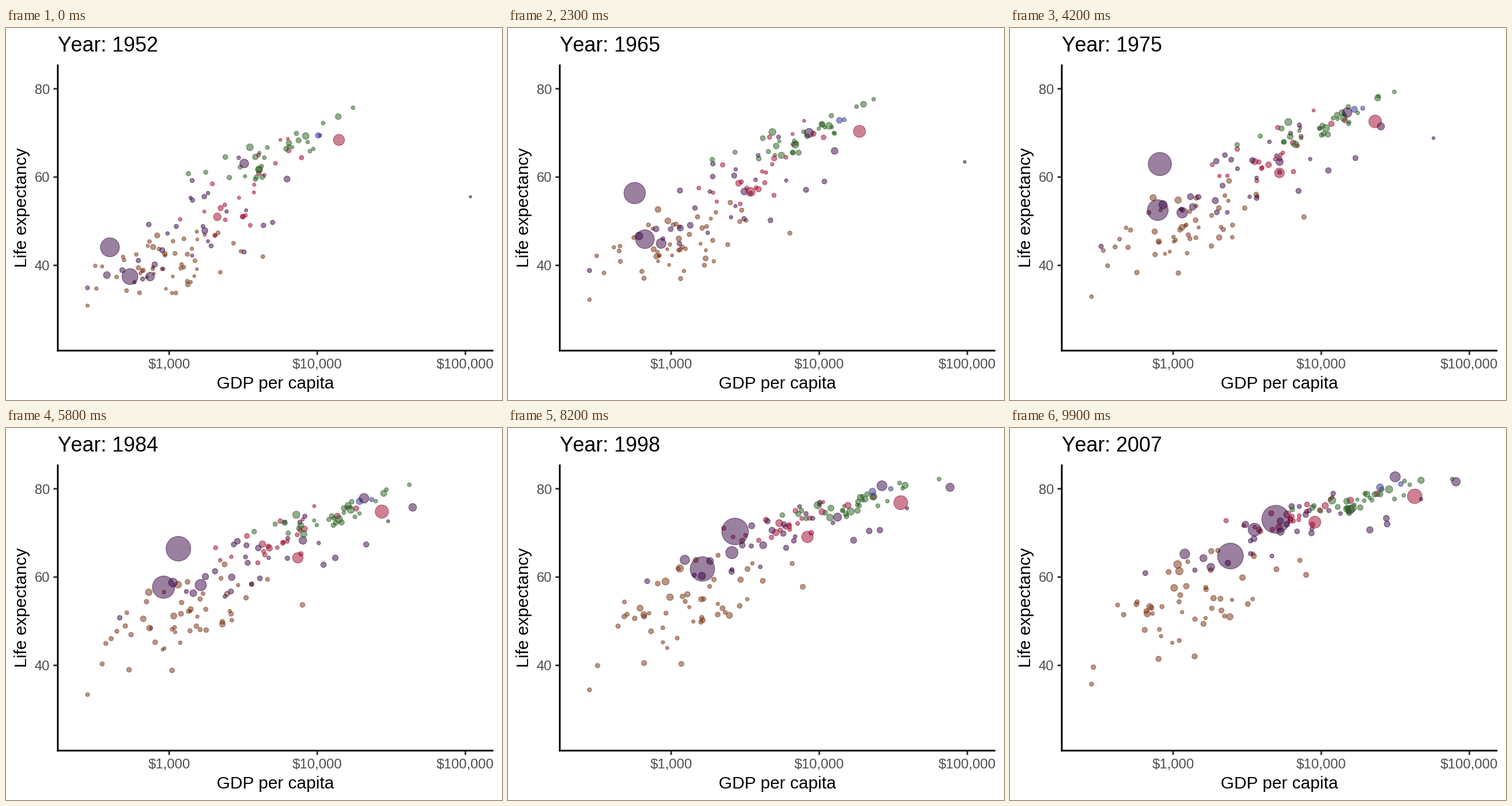
These frames come from a looping animation (864 by 648 pixels, 10000 ms). A matplotlib script:

```python
import numpy as np
import matplotlib.pyplot as plt
from matplotlib.animation import FuncAnimation

W, H, FRAMES = 864, 648, 100
plt.rcParams["font.family"] = "Liberation Sans"
plt.rcParams["path.snap"] = False

t = np.linspace(0, 1, FRAMES)
ease = 1 - (1 - t) ** 1.4
rng = np.random.default_rng(11)

COLORS = dict(africa="#752F0E", americas="#9C0628", asia="#370442",
              europe="#225C1A", oceania="#2D3190")

# Each region is a cloud along a sloping trend; pairs run from start to end.
CLOUDS = dict(
    africa=dict(n=52, pop=(4, 13), x=(278, 318), y=(418, 308),
                sx=(66, 86), sy=(33, 46), slope=(-0.15, -0.35)),
    americas=dict(n=23, pop=(4, 11), x=(415, 500), y=(300, 156),
                  sx=(54, 62), sy=(36, 13), slope=(-0.75, -0.25)),
    asia=dict(n=29, pop=(9, 25), x=(318, 492), y=(355, 174),
              sx=(86, 122), sy=(45, 24), slope=(-0.55, -0.32)),
    europe=dict(n=30, pop=(9, 12), x=(463, 616), y=(220, 124),
                sx=(62, 62), sy=(17, 9), slope=(-0.42, -0.28)),
    oceania=dict(n=2, pop=(4, 10), x=(545, 664), y=(188, 101),
                 sx=(4, 24), sy=(1, 1), slope=(-0.3, -0.2)),
)

# The leading bubbles: population in millions, then a few path points.
STOPS = (0, 0.31, 0.58, 1)
LEADERS = [
    ("asia", (556, 1319), (181, 234, 298, 463), (382, 256, 211, 159)),
    ("asia", (372, 1110), (216, 246, 273, 384), (433, 346, 278, 223)),
    ("americas", (158, 301), (580, 623, 654, 705), (195, 175, 146, 119)),
    ("asia", (82, 224), (251, 272, 338, 426), (433, 356, 275, 177)),
    ("asia", (86, 127), (415, 561, 623, 671), (236, 165, 123, 85)),
    ("americas", (57, 190), (368, 441, 508, 531), (329, 271, 227, 164)),
    ("asia", (0.2, 2.5), (809, 791, 665, 716), (294, 213, 163, 124)),
]

xs, ys, pops, colors = [], [], [], []


def add(region, x, y, pop):
    xs.append(x)
    ys.append(y)
    pops.append(pop)
    colors.append(COLORS[region])


def drift(pair):
    return pair[0] + (pair[1] - pair[0]) * ease


def noise():
    return np.clip(rng.normal(), -1.7, 1.7)


def wander(size):
    """Slow sideways sway, different for every dot."""
    phase, turns = rng.uniform(0, 2 * np.pi), rng.uniform(0.4, 1)
    return size * np.sin(phase + 2 * np.pi * turns * t)


def cloud(region, n, pop, x, y, sx, sy, slope):
    for i in range(n):
        u = (i + 0.5) / n
        spread = 0.55 * np.log(u / (1 - u))
        dx = drift(sx) * (spread + wander(0.25))
        dy = drift(slope) * dx + drift(sy) * (noise() + wander(0.3))
        people = np.exp(0.9 * noise()) * (pop[0] + (pop[1] - pop[0]) * t)
        add(region, np.maximum(drift(x) + dx, 142),
            np.clip(drift(y) + dy, 89, 499), people)


for region, spec in CLOUDS.items():
    cloud(region, **spec)
for region, pop, px, py in LEADERS:
    add(region, np.interp(t, STOPS, px), np.interp(t, STOPS, py),
        np.interp(t, (0, 1), pop))

EDGE = 1.3
xy = np.stack([xs, ys], axis=-1)
radius = 2.6 + 22.4 * np.sqrt(np.array(pops) / 1319) - EDGE / 2

fig = plt.figure(figsize=(W / 72, H / 72), dpi=72, facecolor="white")
ax = fig.add_axes([0, 0, 1, 1])
ax.set(xlim=(0, W), ylim=(H, 0))
ax.axis("off")


def line(x, y, color="black"):
    ax.plot(x, y, color=color, lw=2.9, solid_capstyle="butt", zorder=1)


def label(x, y, text, size, color="black", ha="center", **kw):
    return ax.text(x, y, text, fontsize=size, color=color, ha=ha,
                   va="baseline", **kw)


LEFT, BASE, TICK = 90.2, 562, 7.5
for life in (40, 60, 80):
    y = 413.5 - (life - 40) * 7.69
    line((LEFT - TICK, LEFT), (y, y), "#333333")
    label(76.7, y + 8.8, str(life), 24, "#4D4D4D", "right")
for power in (3, 4, 5):
    x = 284.2 + (power - 3) * 258
    line((x, x), (BASE, BASE + TICK), "#333333")
    label(x, 593.5, f"${10 ** power:,}", 24, "#4D4D4D")
line((LEFT, LEFT), (63.5, BASE + 1.4))
line((LEFT - 1.4, 849), (BASE, BASE))
label(469.3, 627.5, "GDP per capita", 30)
label(36, 313, "Life expectancy", 30, rotation=90, rotation_mode="anchor")

# The capital stands apart so that it is not kerned into the next letter.
label(89.2, 41, "Y", 36, ha="left")
title = label(113.2, 41, "", 36, ha="left")

dots = ax.scatter(xy[:, 0, 0], xy[:, 0, 1], s=(2 * radius[:, 0]) ** 2,
                  c=colors, alpha=0.5, linewidths=EDGE, zorder=2)


def update(i):
    dots.set_offsets(xy[:, i])
    dots.set_sizes((2 * radius[:, i]) ** 2)
    title.set_text(f"ear: {round(1952 + 55 * t[i])}")
    return dots, title


anim = FuncAnimation(fig, update, frames=FRAMES, interval=100, repeat=True,
                     repeat_delay=0, blit=False)
plt.show()
```
